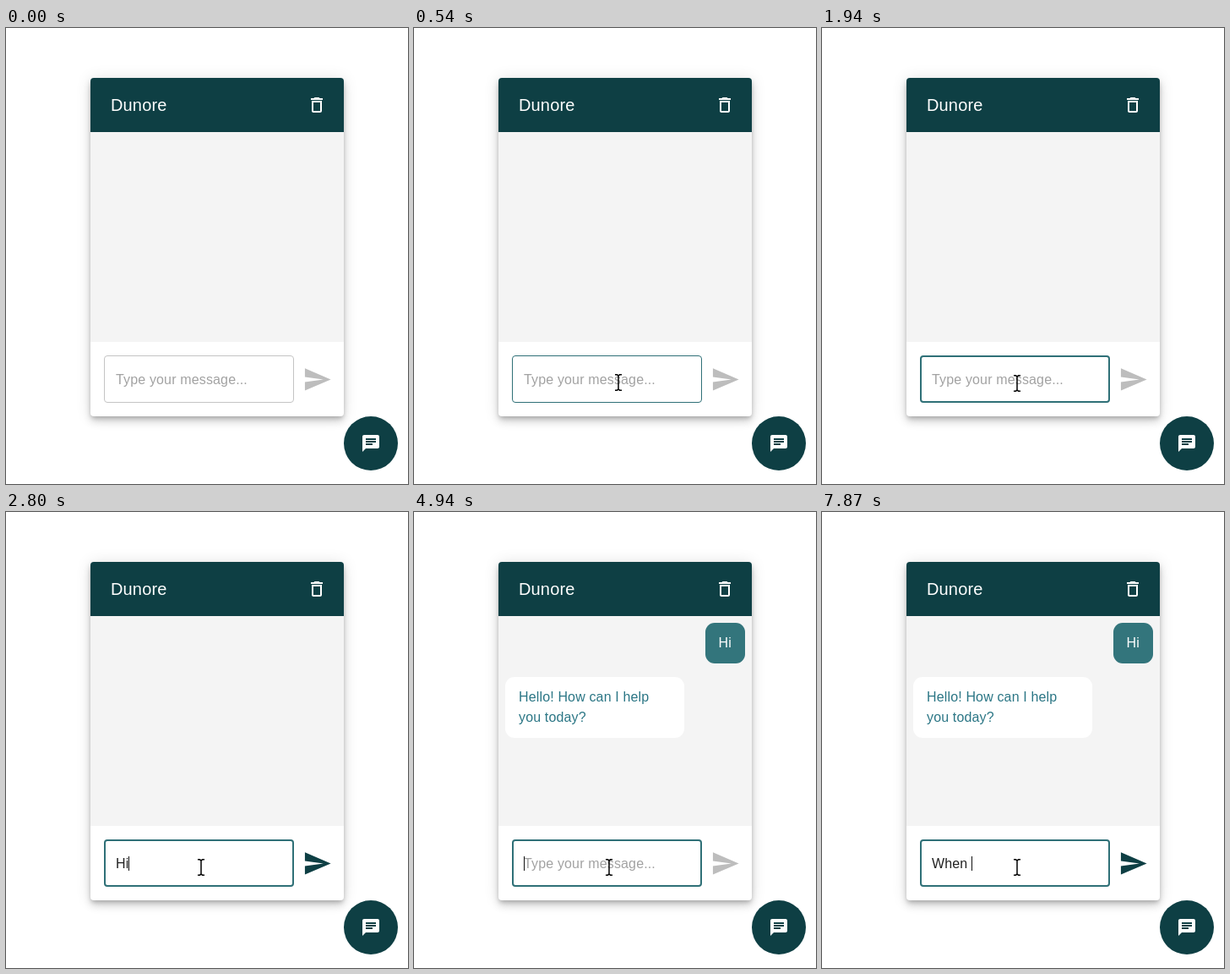
An HTML page that plays this animation: 476 by 539 pixels, repeating every 8 s.

```html
<!DOCTYPE html>
<html lang="en">
<head>
<meta charset="utf-8">
<title>Chat widget</title>
<style>
  html, body { margin: 0; width: 100%; height: 100%; overflow: hidden; background: #fff; }
  .card {
    position: absolute; left: 100px; top: 59px; width: 300px; height: 400px;
    border-radius: 4px; background: #fff;
    box-shadow: 0 3px 5px -1px rgba(0,0,0,.2), 0 6px 10px rgba(0,0,0,.14), 0 1px 18px rgba(0,0,0,.12);
  }
  svg { position: absolute; left: 0; top: 0; display: block; }
  text {
    font: 16px "Liberation Sans", Arial, sans-serif;
    letter-spacing: .15px; white-space: pre;
  }
  .title { font-size: 20px; }
</style>
</head>
<body>
<div class="card"></div>
<svg width="476" height="539" viewBox="0 0 476 539">
  <path fill="#0e3f44" d="M100 123V63a4 4 0 0 1 4-4h292a4 4 0 0 1 4 4v60z"/>
  <text class="title" x="124" y="98" fill="#fff">Dunore</text>
  <path transform="translate(356 79)" fill="#fff" d="M6 19c0 1.1.9 2 2 2h8c1.1 0 2-.9 2-2V7H6v12zM8 9h8v10H8V9zm7.5-5-1-1h-5l-1 1H5v2h14V4h-3.5z"/>
  <rect x="100" y="123" width="300" height="248" fill="#f4f4f4"/>

  <g id="question">
    <rect x="345" y="131" width="47" height="48" rx="11" fill="#33757c"/>
    <text x="360.6" y="160" fill="#fff">Hi</text>
  </g>
  <g id="answer">
    <rect x="108" y="195" width="212" height="72" rx="11" fill="#fff"/>
    <text x="124" y="224" fill="#2b7685">Hello! How can I help</text>
    <text x="124" y="248" fill="#2b7685">you today?</text>
  </g>

  <rect id="field" fill="none"/>
  <text id="hint" x="130" y="421" fill="#a2a2a2">Type your message...</text>
  <text id="typed" x="130" y="421" fill="#212121"></text>
  <rect id="caret" y="407" width="1" height="17" fill="#111"/>
  <path id="send" transform="translate(351 398) scale(1.4583)" d="M2.01 21 23 12 2.01 3 2 10l15 2-15 2z"/>

  <circle cx="432" cy="491" r="32" fill="#0e3f44"/>
  <path transform="translate(420 479)" fill="#fff" d="M20 2H4c-1.1 0-1.99.9-1.99 2L2 22l4-4h14c1.1 0 2-.9 2-2V4c0-1.1-.9-2-2-2zM6 9h12v2H6V9zm8 5H6v-2h8v2zm4-6H6V6h12v2z"/>

  <circle id="click" cx="232" cy="419" r="12" fill="#fff200" fill-opacity=".6"/>
  <g id="arrow">
    <path fill="#ff5354" d="M0 0 22 21 10 22.5z"/>
    <path fill="#fb3035" d="M0 0 10 22.5 0 30z"/>
    <path fill="none" stroke="#222" stroke-width="1.8" stroke-linejoin="round" d="M0 0 22 21 10 22.5 0 30z"/>
  </g>
  <path id="beam" fill="none" stroke="#000" stroke-width="1.5" d="M-4-9.2h2.5L0-8 1.5-9.2H4M0-8V8M-4 9.2h2.5L0 8 1.5 9.2H4"/>
</svg>
<script>
const LOOP = 8000, STEP = 200 / 3, BLINK = 530;
const [question, answer, field, hint, typed, caret, send, click, arrow, beam] =
  ["question", "answer", "field", "hint", "typed", "caret", "send", "click", "arrow", "beam"]
    .map(id => document.getElementById(id));

// time, field content, caret x, time the caret blink restarted
const inputs = [
  [0, "", 130, 890],
  [2070, "H", 141, 2070],
  [2800, "Hi", 145, 2800],
  [3260, "", 130, 2800],
  [5210, "W", 145, 5210],
  [5340, "Wh", 154, 5340],
  [5470, "Whe", 163, 5470],
  [5600, "When", 172, 5600],
  [5730, "When ", 177, 5730]
];

function show(el, on) {
  el.setAttribute("visibility", on ? "visible" : "hidden");
}

function set(el, attrs) {
  for (const name in attrs) el.setAttribute(name, attrs[name]);
}

function drawPointer(t) {
  const step = Math.floor((t + 1) / STEP);
  const left = 1 - Math.min(1, Math.max(0, (step - 1) * STEP / 690));
  let x = 232 - 134 * -(left ** 2.3);
  const y = 420 - 436 * left ** 6;
  const inside = y > 387;
  if (t >= 1280) x = 231;
  const place = `translate(${Math.round(x)} ${Math.round(y)})`;
  set(arrow, { transform: place });
  set(beam, { transform: place });
  show(arrow, t >= 70 && !inside);
  show(beam, t >= 70 && inside);
  show(click, t >= 890 && t < 1020);
  return inside;
}

function drawField(t, hover) {
  const focus = t >= 890, width = focus ? 2 : 1;
  set(field, {
    x: 116 + width / 2, y: 387 + width / 2,
    width: 225 - width, height: 56 - width, rx: 4 - width / 2,
    "stroke-width": width, stroke: focus || hover ? "#2f7077" : "#c4c4c4"
  });
  const [, text, x, start] = inputs.findLast(row => t >= row[0]);
  typed.textContent = text;
  show(hint, !text);
  set(send, { fill: text ? "#0e3f44" : "#bdbdbd" });
  set(caret, { x });
  // the small offset absorbs the uneven blink intervals
  show(caret, focus && Math.floor((t - start + 5) / (BLINK + 5)) % 2 === 0);
}

function draw(t) {
  drawField(t, drawPointer(t));
  show(question, t >= 3260);
  show(answer, t >= 3950);
}

const begin = performance.now();
function tick(now) {
  draw(Math.max(0, now - begin) % LOOP);
  requestAnimationFrame(tick);
}
draw(0);
requestAnimationFrame(tick);
</script>
</body>
</html>
```
